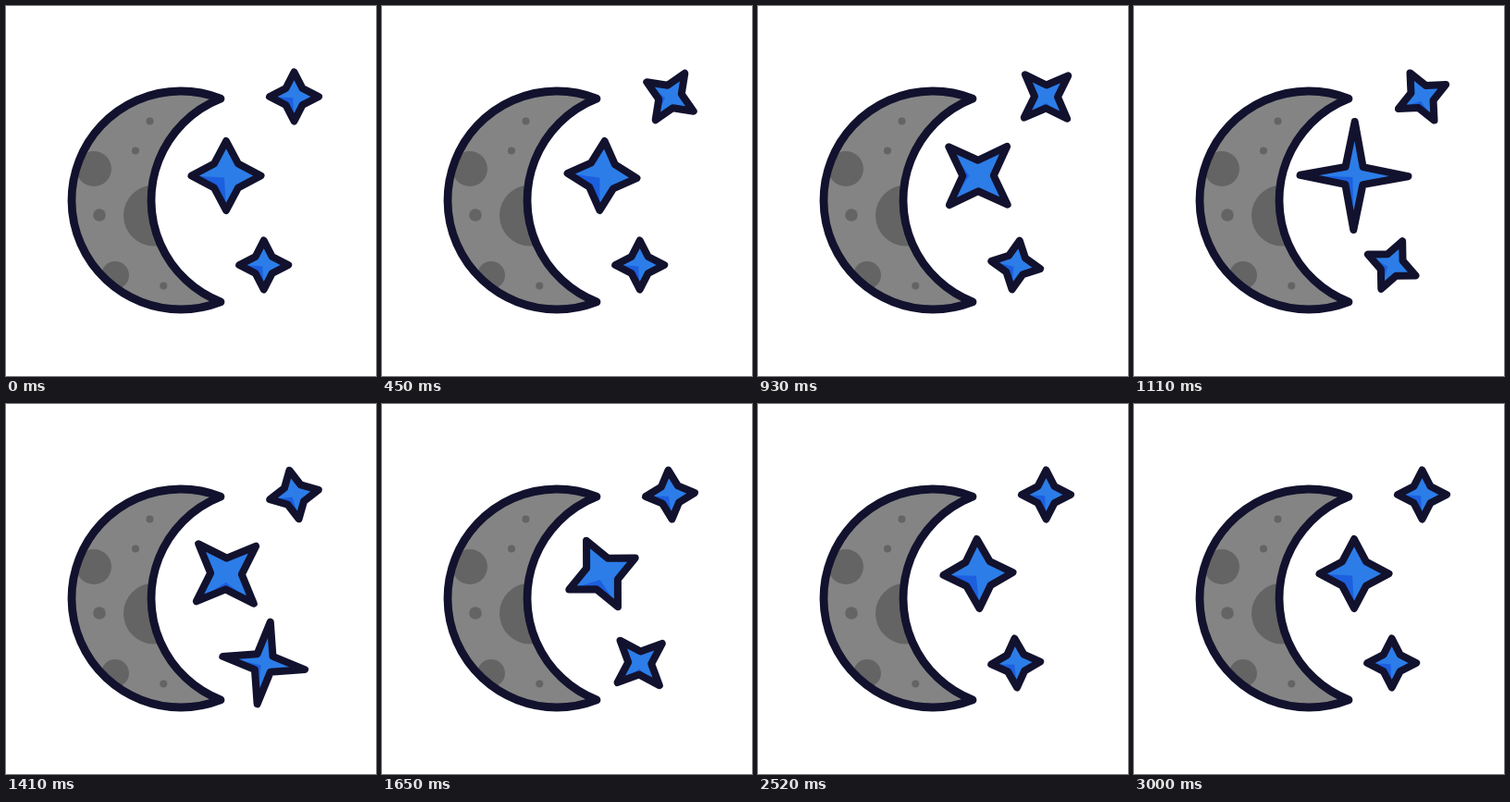
Animation, 400 px wide and 400 px high, one loop 3120 ms. Source, as an HTML page with a canvas:

```html
<!DOCTYPE html>
<html lang="en">
<head>
<meta charset="utf-8">
<title>Moon and stars</title>
<style>
  html, body { margin: 0; width: 100%; height: 100%; overflow: hidden; background: #fff; }
  canvas { display: block; width: 400px; height: 400px; }
</style>
</head>
<body>
<canvas id="stage" width="400" height="400"></canvas>
<script>
const ctx = document.getElementById('stage').getContext('2d');
const LOOP = 3120, STEP = 30, END = 3000;
const INK = '#12122e', GREY = '#848484', CRATER = '#646464';
const LIGHT = '#2c7de8', DARK = '#1c5fdf';

// Each star makes half a turn while its points stretch and shrink back.
const STARS = [
  { x: 311.5, y: 98, tip: 26.5, grow: 20, notch: 9, thin: 0.5, start: 20, time: 2100, ease: [0.4, 0.08] },
  { x: 238, y: 183.5, tip: 37.5, grow: 21, notch: 13, thin: 3.5, start: 88, time: 2912, ease: [0.55, 0.05] },
  { x: 278.7, y: 280, tip: 26.5, grow: 20, notch: 9, thin: 0.5, start: 500, time: 2500, ease: [0.554, 0.048] }
];

const CRATERS = [
  [95, 176, 19], [160, 226.5, 33], [155.5, 124.5, 4], [140, 156.5, 4],
  [101, 226, 6.8], [118, 291, 15], [170.3, 302.5, 4]
];

const clamp = v => Math.min(1, Math.max(0, v));

// Cubic bezier timing through (a, 0) and (b, 1).
function ease(u, [a, b]) {
  let lo = 0, hi = 1;
  for (let i = 0; i < 30; i++) {
    const s = (lo + hi) / 2, r = 1 - s;
    const x = 3 * a * s * r * r + 3 * b * s * s * r + s * s * s;
    if (x < u) lo = s; else hi = s;
  }
  const s = (lo + hi) / 2;
  return s * s * (3 - 2 * s);
}

function outline(width) {
  ctx.strokeStyle = INK;
  ctx.lineWidth = width;
  ctx.lineJoin = 'round';
  ctx.stroke();
}

// Two equal arcs that meet exactly at the horns.
function moonPath() {
  const cx = 189, cy = 210, r = 118, dx = 43;
  const a = Math.acos(dx / r);
  ctx.beginPath();
  ctx.arc(cx, cy, r, -a, a, true);
  ctx.arc(cx + 2 * dx, cy, r, Math.PI - a, Math.PI + a);
  ctx.closePath();
}

function drawMoon() {
  ctx.save();
  moonPath();
  ctx.fillStyle = GREY;
  ctx.fill();
  ctx.clip();
  ctx.fillStyle = CRATER;
  for (const [x, y, r] of CRATERS) {
    ctx.beginPath();
    ctx.arc(x, y, r, 0, Math.PI * 2);
    ctx.fill();
  }
  ctx.restore();
  moonPath();
  outline(8.8);
}

// Notches run clockwise from the upper right; depth scales each one.
function starPath(tip, notch, depth) {
  ctx.beginPath();
  for (let i = 0; i < 4; i++) {
    const a = i * Math.PI / 2, b = a + Math.PI / 4;
    const d = notch * Math.SQRT2 * depth[i];
    ctx.lineTo(tip * Math.sin(a), -tip * Math.cos(a));
    ctx.lineTo(d * Math.sin(b), -d * Math.cos(b));
  }
  ctx.closePath();
}

function drawStar(star, t) {
  const p = ease(clamp((t - star.start) / star.time), star.ease);
  const off = Math.abs(2 * p - 1);
  const stretch = Math.pow(1 - Math.pow(off, 1.5), 2.5);
  const tip = star.tip + star.grow * stretch;
  const notch = star.notch - star.thin * stretch;
  const full = [1, 1, 1, 1];
  const shade = v => 1 - 0.85 * clamp(v);

  ctx.save();
  ctx.translate(star.x, star.y);
  ctx.rotate(p * Math.PI);
  starPath(tip, notch, full);
  ctx.fillStyle = DARK;
  ctx.fill();
  // The shade moves against the turn, so it stays on the lower side.
  starPath(tip, notch, [shade(2 * p - 1), shade(1 - 2 * off), shade(1 - 2 * p), 1]);
  ctx.fillStyle = LIGHT;
  ctx.fill();
  starPath(tip, notch, full);
  outline(8);
  ctx.restore();
}

function draw(now) {
  const t = Math.min(END, Math.floor((now % LOOP) / STEP) * STEP);
  ctx.fillStyle = '#fff';
  ctx.fillRect(0, 0, 400, 400);
  drawMoon();
  for (const star of STARS) drawStar(star, t);
}

const begin = performance.now();
function tick() {
  draw(performance.now() - begin);
  requestAnimationFrame(tick);
}
tick();
</script>
</body>
</html>
```
